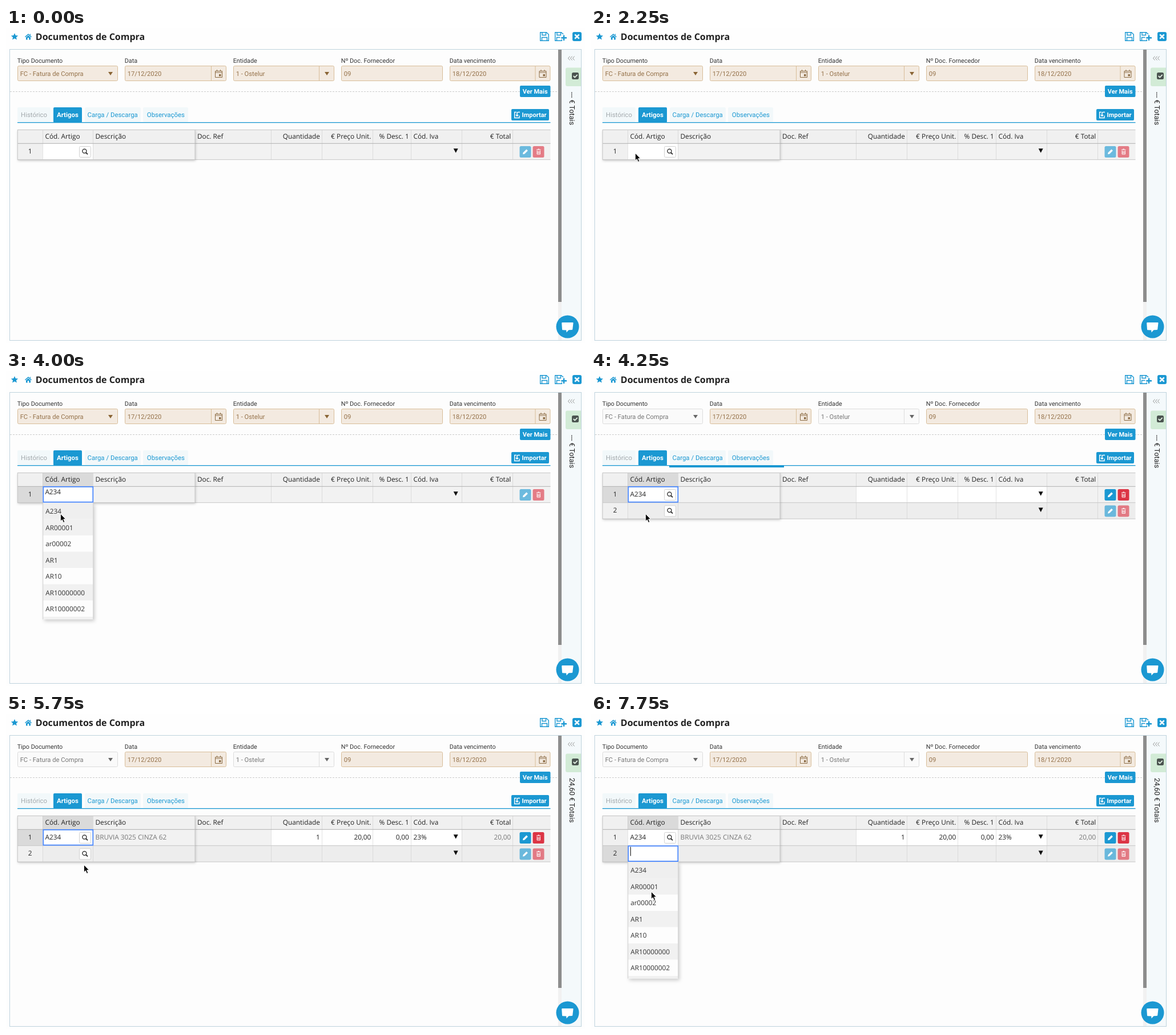
An HTML page that plays this animation: 1014 px wide and 552 px high, repeating every 8000 ms.

```html
<!DOCTYPE html>
<html lang="pt">
<head>
<meta charset="utf-8">
<title>Documentos de Compra</title>
<style>
html, body { margin: 0; width: 100%; height: 100%; overflow: hidden; background: #fefefe; }
svg { display: block; text-rendering: geometricPrecision; }
text { font: 11.8px "Open Sans", sans-serif; fill: #222; white-space: pre; }
.ui { font: 11.2px Roboto, sans-serif; }
.label { font: 10.8px Roboto, sans-serif; fill: #333; }
.tab { font: 11.4px Roboto, sans-serif; }
.bold { font: bold 11px Roboto, sans-serif; fill: #fff; }
.title { font: bold 16px "Open Sans", sans-serif; }
.total { font: 12.6px Roboto, sans-serif; }
.lift { filter: drop-shadow(1px 2px 2px #0003); }
.float { filter: drop-shadow(2px 3px 3px #0003); }
</style>
</head>
<body>
<svg id="stage" width="1014" height="552" viewBox="0 0 1014 552"></svg>
<script>
const BLUE = '#1b98d2', GREY = '#f2f2f2', LINE = '#c6c6c6', BROWN = '#95724a';
const STEP = 250, LOOP = 8000, ROW = 28.4;
const COLS = [20, 64.5, 152.5, 331, 464.5, 553.5, 643, 709.5, 798.5, 888, 953.5];
const HEADS = ['', 'Cód. Artigo', 'Descrição', 'Doc. Ref', 'Quantidade', '€ Preço Unit.', '% Desc. 1', 'Cód. Iva', '€ Total', ''];
const VALUES = ['1', 'A234', 'BRUVIA 3025 CINZA 62', '', '1', '20,00', '0,00', '23%', '20,00', ''];
const RIGHT = [4, 5, 6, 8];
const ITEMS = ['A234', 'AR00001', 'ar00002', 'AR1', 'AR10', 'AR10000000', 'AR10000002'];
// time, x, y of the pointer
const POINTER = [[1250, 528, 64], [1500, 411, 109], [1750, 215, 149], [2000, 90, 217], [2250, 77, 219],
  [3000, 79, 219], [3250, 77, 220], [3500, 95, 250], [5000, 102, 287], [5250, 103, 286], [5750, 136, 264],
  [6000, 77, 244], [6250, 76, 245], [7500, 107, 313], [7750, 105, 311]];

const rect = (x, y, w, h, fill, more = '') => `<rect x="${x}" y="${y}" width="${w}" height="${h}" fill="${fill}" ${more}/>`;
const text = (x, y, s, cls = '', more = '') => `<text x="${x}" y="${y}" class="${cls}" ${more}>${s}</text>`;
const path = (d, fill = 'none', stroke = 'none', width = 1) => `<path d="${d}" fill="${fill}" stroke="${stroke}" stroke-width="${width}"/>`;
const at = (x, y, s) => `<g transform="translate(${x} ${y})">${s}</g>`;
const paint = c => `style="fill:${c}"`;

const floppy = path('M.7 .7H11.5L15.3 4.3V15.3H.7ZM4 .7V5.5H10.5V.7M3.5 15V9.5H12.5V15', 'none', BLUE, 1.4);
const calendar = c => path('M.5 2.5H12.5V13.5H.5ZM3.5 0V3M9.5 0V3M.5 5H12.5', 'none', c) + rect(7, 8, 3.5, 3.5, c);
const search = y => rect(128.5, y + 5.2, 20, 19, '#fff', 'rx="2" stroke="#d0d0d0"') +
  `<circle cx="137.4" cy="${y + 13.4}" r="3.5" fill="none" stroke="#222" stroke-width="1.3"/>` +
  path(`M140 ${y + 16}L143 ${y + 19}`, 'none', '#222', 1.7);

function field(x, w, label, value, kind, off) {
  const ink = off ? '#777' : BROWN, edge = off ? '#dcdcdc' : '#d8bd99';
  let s = text(x - .3, 61, label, 'label') +
    rect(x + .5, 66.5, w - 1, 26, off ? '#fafafa' : '#f3eae0', `rx="2" stroke="${edge}"`) +
    text(x + 4.7, 83.5, value, 'ui', paint(ink));
  if (kind != 'plain' && kind != 'select') s += path(`M${x + w - 26.5} 67V92`, 'none', edge);
  if (kind == 'date') s += at(x + w - 20, 73, calendar('#8a6a42'));
  if (kind == 'select' || kind == 'combo') s += path(`M${x + w - 17} 77h8l-4 6z`, off ? '#666' : '#8a6535');
  return s;
}

function frame(locked, total) {
  const chevron = x => `M${x} 49.5l-3 3.5 3 3.5`;
  return rect(0, 0, 1014, 552, '#fefefe') +
    path('M15 9l1.8 4 4.4.4-3.3 2.9 1 4.2-3.9-2.2-3.9 2.2 1-4.2-3.3-2.9 4.4-.4z', BLUE) +
    path('M39 10l6 5.3-1 1-5-4.4-5 4.4-1-1zM39 13l4 3.5V20.5H40.3V17H37.7V20.5H35V16.5zM41.7 10.5h1.5v2.5l-1.5-1.2z', BLUE) +
    text(51.8, 21, 'Documentos de Compra', 'title') +
    at(935, 7, floppy) + at(961, 7, floppy) +
    path('M976.5 11V24M970.5 17.3H983', 'none', '#fefefe', 5) + path('M977 12.5V22M972.3 17.3H982', 'none', BLUE, 2.4) +
    rect(992, 7, 16, 16, BLUE, 'rx="3"') + path('M996.3 11.3l7.4 7.4m0-7.4l-7.4 7.4', 'none', '#fff', 2.6) +
    rect(6.5, 37.5, 1001, 510, '#fdfdfd', 'stroke="#bfd3dd"') +
    rect(967, 38, 6, 509, '#f1f1f1') + rect(967, 38, 6, 442, '#8d8d8d') +
    rect(973, 38, 34, 509, '#f4f9fb') +
    path(chevron(987.5) + chevron(991.5) + chevron(995.5), 'none', '#888', .9) +
    path('M1007 69.5H983q-3 0-3 3V99q0 3 3 3H1007z', '#d2ebd6') +
    rect(991, 78, 12, 12, '#4b5450', 'rx="2.5"') + path('M993.7 84l2.5 2.5 4.5-4.7', 'none', '#e4f3e6', 1.8) +
    `<g transform="translate(987 112) rotate(90)">${text(0, 0, total + ' € Totais', 'total')}</g>` +
    field(20, 176, 'Tipo Documento', 'FC - Fatura de Compra', 'select', locked) +
    field(208, 178, 'Data', '17/12/2020', 'date') +
    field(398, 177, 'Entidade', '1 - Ostelur', 'combo', locked) +
    field(587, 178, 'Nº Doc. Fornecedor', '09', 'plain') +
    field(777, 176.5, 'Data vencimento', '18/12/2020', 'date') +
    `<path d="M7 111.5H966" stroke="#ccc" stroke-dasharray="3 2"/>` +
    rect(900, 101, 53.5, 20, BLUE, 'rx="2"') + text(904.8, 115, 'Ver Mais', 'bold') +
    [[20, 58, 'Histórico', '#a3a9ad', 26], [138, 98, 'Carga / Descarga', BLUE, 142.6], [240, 79, 'Observações', BLUE, 246.8]]
      .map(([x, w, s, c, tx]) => rect(x, 139, w, 26, '#f2f8fa', 'rx="2"') + text(tx, 156, s, 'tab', paint(c))).join('') +
    rect(83, 139, 50, 27, BLUE, 'rx="2"') + text(89, 156, 'Artigos', 'bold', 'style="font-size:11.4px"') +
    rect(20, 165, 933.5, 1.3, BLUE) +
    rect(885, 142, 66, 20, BLUE, 'rx="2"') + text(903.5, 156, 'Importar', 'bold') +
    path('M894 147.5h-3.3v10H899v-4M900 147.5h-3q-2 0-2 2.2v4.5m-2-2l2 2.3 2-2.3', 'none', '#fff', 1.4) +
    `<circle cx="983.5" cy="523.5" r="20" fill="${BLUE}"/>` +
    path('M974.5 516h18q1 0 1 1l-1.3 11q-.1 1-1.2 1l-5.5.3-4 4.2-.3-4-6.2-.2q-1 0-1-1l-.8-11q0-1.3 1.3-1.3z', '#fff');
}

function cellText(i, y, s, color) {
  if (i == 0) return text(42, y, s, '', 'text-anchor="middle"');
  return RIGHT.includes(i) ? text(COLS[i + 1] - 3.7, y, s, '', `text-anchor="end" ${paint(color)}`) : text(COLS[i] + 4, y, s, '', paint(color));
}

function cell(i, y, h, fill) {
  const x = COLS[i], r = COLS[i + 1];
  return rect(x, y, r - x, h, fill) + (i < 9 ? path(`M${r} ${y}v${h}`, 'none', LINE) : '');
}

function buttons(y, on) {
  return `<g opacity="${on ? 1 : .62}">` + rect(899.5, y + 4.7, 20, 20, BLUE, 'rx="2.5"') + rect(922.5, y + 4.7, 20, 20, '#dc3545', 'rx="2.5"') + '</g>' +
    path(`M905 ${y + 19}l.7-3 5.8-5.8 2.4 2.4-5.8 5.8z`, '#fff') +
    path(`M929 ${y + 11}h7.5m-5-1.2h2.5M930 ${y + 12.5}v6.3h5.5v-6.3m-3.8 1v4m2 0v-4`, 'none', '#fff');
}

// active: the first row holds an article; sel: the selected row or -1
function grid({ active, filled, sel }) {
  const rows = active ? 2 : 1, top = 178.5, first = 202.3, bottom = first + rows * ROW;
  let side = '', frozen = '';
  for (let i = 0; i < 10; i++) {
    let s = cell(i, top, first - top, i == 1 && sel >= 0 ? '#dadada' : '#f0f0f0') + cellText(i, 194, HEADS[i], '#222');
    for (let r = 0; r < rows; r++) {
      const y = first + r * ROW, live = active && r == 0;
      let fill = r ? '#ededed' : GREY;
      if (i == 0) fill = r == sel ? '#dadada' : '#f0f0f0';
      else if (r == 0 && i == 1 || live && i > 3 && i < 8) fill = '#fff';
      s += cell(i, y, ROW, fill);
      if (i == 0) s += cellText(0, y + 17.7, r + 1);
      else if (live && (i == 1 || filled)) s += cellText(i, y + 17.7, VALUES[i], i == 2 || i == 8 ? '#777' : '#222');
      if (i == 1) s += search(y);
      if (i == 7) s += path(`M783.7 ${y + 8.9}h8l-4 7.6z`, '#111');
      if (i == 9) s += buttons(y, live);
    }
    if (i < 3) frozen += s; else side += s;
  }
  const rules = to => path(`M20 ${top}H${to}M20 ${bottom}H${to}` + (rows > 1 ? `M20 ${first + ROW}H${to}` : ''), 'none', LINE) +
    path(`M20 ${first}H${to}`, 'none', '#b0b0b0');
  return side + rules(953.5) + rect(20, top, 311, bottom - top, '#f0f0f0', 'class="lift"') + frozen + rules(331) +
    path(`M20.3 ${top}V${bottom}`, 'none', LINE);
}

const outline = y => rect(65.3, y + .6, 87, ROW - 1.6, 'none', 'stroke="#4b89ff" stroke-width="1.8"');

function editor(y, value, caret) {
  const head = y + ROW + .5;
  let s = rect(65, head, 88, 204, '#fdfdfd', 'class="float"');
  ITEMS.forEach((name, i) => {
    const fill = i == 0 ? '#efefef' : i % 2 ? '#f1f1f1' : '#fdfdfd';
    s += rect(65, head + i * 28.5, 88, 28.5, fill) + text(69.2, y + 47.7 + i * 28.5, name, '', paint('#333'));
  });
  s += rect(65, head + 199.5, 88, 4, '#f1f1f1') + path(`M64.7 ${head}v204M152.7 ${head}v204`, 'none', '#d0d0d0');
  s += rect(65, y, 88, ROW, '#fff') + text(68.4, y + 13.4, value);
  if (caret) s += rect(68.8, y + 2, 1, 16, '#000');
  return s + outline(y);
}

function scene(t) {
  const active = t >= 4250, filled = t >= 5000, y1 = 202.3, y2 = y1 + ROW;
  const sel = t < 2750 ? -1 : t < 6500 ? 0 : 1;
  let s = frame(active, filled ? '24,60' : '---') + grid({ active, filled, sel });
  if (t >= 3000 && t < 4250) s += editor(y1, t >= 4000 ? 'A234' : '', t < 3250 || t == 3750);
  else if (t >= 6750) s += editor(y2, '', t < 7250 || t >= 7750);
  else if (sel >= 0) s += outline(sel ? y2 : y1);
  if (active && !filled) {
    const k = (t - 4250) / STEP, left = 137 + 73.5 * k;
    s += rect(left, 166, 338 + 216 * k - left, 3, BLUE);
  }
  const p = POINTER.filter(q => q[0] <= t).pop();
  if (p) s += at(p[1], p[2], path('M.5 .3V13.2L3.4 10.5 5.5 15.5 7.8 14.5 5.7 9.7H9.6Z', '#000', '#fff', .9));
  return s;
}

const stage = document.getElementById('stage');
let shown = -1;
function tick() {
  const t = Math.floor(performance.now() % LOOP / STEP) * STEP;
  if (t != shown) stage.innerHTML = scene(shown = t);
  requestAnimationFrame(tick);
}
tick();
</script>
</body>
</html>
```
